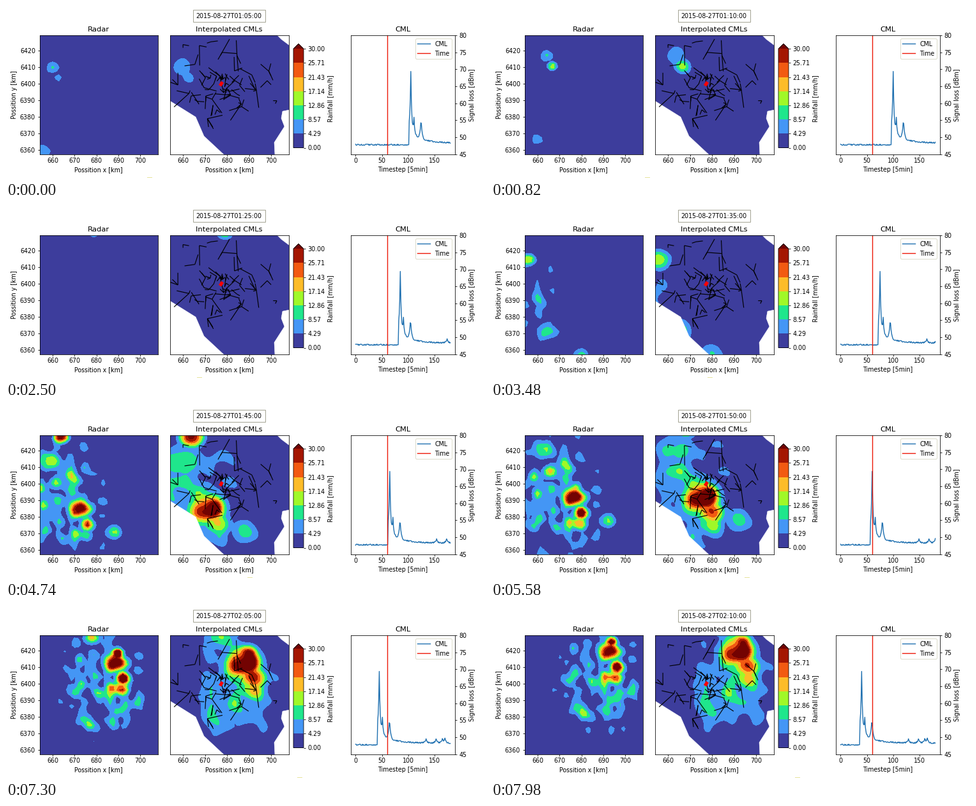
A matplotlib script for the animation above (8 s loop, 750x270 px).

```python
import numpy as np
import matplotlib.pyplot as plt
from matplotlib.animation import FuncAnimation
from matplotlib.collections import LineCollection
from matplotlib.colors import BoundaryNorm, ListedColormap
from matplotlib.patches import Rectangle

W, H = 750, 270
N_FRAMES, STEP = 100, 80           # 8 s loop
STATES, STATE_MS, LEAD = 14, 578, 120
PANEL_W, PANEL_H = 185.5, 186.5
DRIFT = 14, -18                    # storm motion in pixels per state
EDGE = 30 / 7                      # lowest visible rain level

plt.rcParams.update({
    "font.family": "DejaVu Sans", "font.size": 9.55,
    "xtick.major.size": 3.3, "ytick.major.size": 3.3,
    "xtick.major.pad": 1.6, "ytick.major.pad": 3.3,
    "axes.titlepad": 5.7, "axes.labelpad": 3.8,
    "axes.linewidth": 0.8, "lines.linewidth": 1.4,
})

LEVELS = np.linspace(0, 30, 8)
CMAP = ListedColormap(["#3d3d9c", "#4496f5", "#1fe68c", "#a0f828",
                       "#fcbc28", "#f25a12", "#a41601"])
CMAP.set_over("#730302")
NORM = BoundaryNorm(LEVELS, 7)

# Storm cells: state of full strength, lifetime, x, y, radius, peak rate
CELLS = [(10.5, 4.2, 96, 70, 21, 45), (11, 3.6, 116, 86, 16, 40),
         (11.5, 3.6, 121, 94, 15, 27), (11.5, 2.5, 115, 37, 12, 38),
         (8, 2.2, 34, 3, 14, 42), (8, 1.5, 16, 40, 19, 20),
         (10.5, 3, 61, 31, 15, 16), (11, 1.8, 86, 11, 8, 28),
         (8, 2.8, 115, 152, 13, 14), (2.5, 2.5, 64, 21, 9, 21),
         (1, 3, 34, 32, 9, 8), (0, 1.5, 4, 182, 10, 7), (2, 1.4, 3, 148, 10, 11)]

# Corners of the map that no link reaches
GAPS = [[(0, 103), (40, 128), (53, 158), (84, 187), (0, 187)],
        [(186, 117), (176, 119), (174, 130), (179, 143), (163, 168),
         (164, 187), (186, 187)],
        [(168, 0), (174, 6), (186, 15), (186, 0)]]

rng = np.random.default_rng(11)
WAVES = rng.normal(0, 0.17, (30, 2))
PHASES = rng.uniform(0, 2 * np.pi, 30)


def to_km(points):
    p = np.asarray(points, float)
    return np.column_stack([654.04 + p[:, 0] / 3.4375, 6429.2 - p[:, 1] / 2.6])


def texture(x, y):
    """Smooth random field with unit variance."""
    waves = (np.cos(a * x + b * y + c) for (a, b), c in zip(WAVES, PHASES))
    return sum(waves) * np.sqrt(2 / len(WAVES))


def rain(k, gx, gy, spread, gain, base, fine):
    """Drifting cells over a patchy rain band that moves in from the west."""
    noise = texture((gx - DRIFT[0] * k) * fine, (gy - DRIFT[1] * k) * fine)
    cx, cy = 5 + 16.4 * (k - 6), 115 - 6 * (k - 6)
    band = np.exp(-((gx - cx) / 68) ** 2 - ((gy - cy) / 88) ** 2)
    ramp = np.clip((k - 4.5) / 3, 0, 1)
    total = (base * ramp * band * np.exp(0.45 * fine * noise)) ** 5
    for mid, life, x, y, r, peak in CELLS:
        dx = (gx - x - DRIFT[0] * (k - mid)) / (r * spread)
        dy = (gy - y - DRIFT[1] * (k - mid)) / (r * spread * 0.85)
        now = gain * peak * np.exp(-((k - mid) / life) ** 4)
        shape = np.exp(-np.log(peak / EDGE) * (dx ** 2 + dy ** 2))
        total = total + (now * shape * np.exp(0.18 * noise)) ** 5
    return total ** 0.2 + 0.1


def bump(u, centre, height, width):
    return height * np.exp(-np.abs(u - centre) / width)


def signal(u):
    """Signal loss in dBm at minute u: rain peaks and a slow drying."""
    wet = 0.5 + 3.5 * np.exp(-(u - 103) / 22)
    wet = wet + bump(u, 105, 18, 1.6) + bump(u, 111, 4.6, 1.4)
    wet = wet + bump(u, 124.5, 6.2, 1.7)
    for centre in (194, 213, 225, 230):
        wet = wet + bump(u, centre, 1.2, 2)
    return 47.8 + np.where(u > 101, wet, 0)


def network():
    """Hubs with a few spokes each, densest around the centre."""
    spokes = []
    for (sx, sy), hubs, reach in (((15, 10), 13, 3), ((42, 38), 30, 5)):
        for x, y in rng.normal((82, 72), (sx, sy), (hubs, 2)):
            y = np.clip(y, 10, 172)
            x = np.clip(x, max(10, y * 0.8 - 50), 168)
            n = rng.integers(2, 5)
            angle = rng.uniform(0, 2 * np.pi, n)
            size = np.clip(rng.gamma(3, reach, n), 5, 32)
            spokes += [to_km([(x, y), (x + s * np.cos(a), y + s * np.sin(a))])
                       for a, s in zip(angle, size)]
    return spokes


def axes_at(x, y, w, h):
    return fig.add_axes([x / W, 1 - (y + h) / H, w / W, h / H])


def map_axes(x, title):
    ax = axes_at(x, 46.2, PANEL_W, PANEL_H)
    (x0, y1), (x1, y0) = to_km([(0, 0), (PANEL_W, PANEL_H)])
    ax.set(xlim=(x0, x1), ylim=(y0, y1), title=title,
           xticks=range(660, 701, 10))
    ax.set_xlabel("Possition x [km]", labelpad=4.2)
    return ax


def contours(ax, n, **look):
    """One hidden filled contour set per state."""
    px, py = np.linspace(0, PANEL_W, n), np.linspace(0, PANEL_H, n)
    gx, gy = np.meshgrid(px, py)
    km = to_km(np.column_stack([px, py]))
    sets = []
    for k in range(STATES):
        cs = ax.contourf(km[:, 0], km[:, 1], rain(k, gx, gy, **look),
                         levels=LEVELS, cmap=CMAP, norm=NORM, extend="max")
        cs.set_visible(False)
        sets.append(cs)
    return sets


fig = plt.figure(figsize=(W / 72, H / 72), dpi=72, facecolor="white")

radar_ax = map_axes(52.5, "Radar")
radar_ax.set(ylabel="Possition y [km]", yticks=range(6360, 6421, 10))
radar_sets = contours(radar_ax, 38, spread=1, gain=1, base=6.5, fine=1)

link_ax = map_axes(257, "Interpolated CMLs")
link_ax.set_yticks([])
link_sets = contours(link_ax, 90, spread=1.8, gain=0.75, base=8.5, fine=0.6)
for gap in GAPS:
    link_ax.fill(*to_km(gap).T, color="white", lw=0.5, zorder=2)
link_ax.add_collection(
    LineCollection(network(), colors="black", lw=1.15, zorder=3), autolim=False)
link_ax.plot(*to_km([(78, 79), (82, 73)]).T, color="red", lw=5, zorder=4,
             solid_capstyle="butt")

bar = fig.colorbar(link_sets[0], cax=axes_at(450, 59.5, 16, 163),
                   ticks=LEVELS, format="%.2f")
bar.set_label("Rainfall [mm/h]")

cml_ax = axes_at(540, 46.2, 163, PANEL_H)
cml_ax.yaxis.tick_right()
cml_ax.yaxis.set_label_position("right")
cml_ax.set(xlim=(-9, 189), ylim=(45, 80), title="CML",
           xticks=range(0, 151, 50), yticks=range(45, 81, 5),
           ylabel="Signal loss [dBm]")
cml_ax.set_xlabel("Timestep [5min]", labelpad=4.2)
minutes = np.arange(181 + 5 * STATES)
loss = signal(minutes) + rng.choice([-0.15, 0, 0.15], minutes.size)
cml_line, = cml_ax.plot(np.arange(181), loss[:181], color="#1f70b0",
                        label="CML")
cml_ax.axvline(60, color="#ec1808", label="Time")
cml_ax.legend(loc="upper right", edgecolor="#d4d4c0")

fig.add_artist(Rectangle((293 / W, 1 - 24.7 / H), 112.5 / W, 18.5 / H,
                         fc="white", ec="#9a9a88", lw=0.9))
stamp = fig.text(349 / W, 1 - 15 / H, "", ha="center", va="center_baseline")
handle = Rectangle((0, 0), 8 / W, 1.3 / H, color="#e6e29a", lw=0)
fig.add_artist(handle)


def update(i):
    k = (i * STEP + LEAD) // STATE_MS
    for sets in (radar_sets, link_sets):
        for j, cs in enumerate(sets):
            cs.set_visible(j == k)
    m = 65 + 5 * k
    stamp.set_text(f"2015-08-27T{m // 60:02d}:{m % 60:02d}:00")
    cml_line.set_ydata(loss[5 * k:5 * k + 181])
    handle.set_x((221 + 19.6 * k) / W)
    return stamp, cml_line, handle


anim = FuncAnimation(fig, update, frames=N_FRAMES, interval=STEP, repeat=True,
                     repeat_delay=0, blit=False)
plt.show()
```
